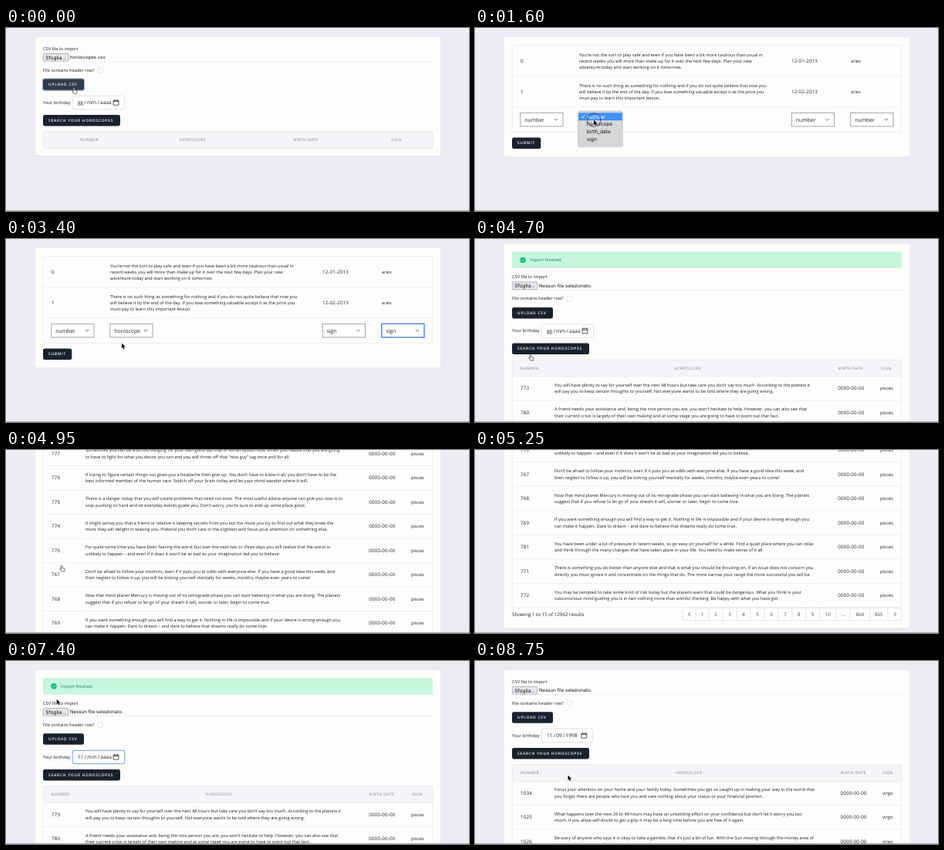
An HTML page that plays this animation: 600x238 px, repeating every 8850 ms.

```html
<!DOCTYPE html>
<html lang="en">
<head>
<meta charset="utf-8">
<title>CSV import</title>
<style>
html, body { margin: 0; width: 100%; height: 100%; overflow: hidden; background: #ecedf2; }
svg { display: block; width: 100%; height: 100%; font-family: "Open Sans", "Noto Sans", sans-serif; text-rendering: geometricPrecision; }
.native { font-family: Inter, Roboto, sans-serif; }
</style>
</head>
<body>
<svg id="stage" viewBox="0 0 600 238"></svg>
<script>
const LOOP = 8850;
const INK = '#1b212c', LINE = '#e3e5ea', DARK = '#19212d';
const FIELDS = ['number', 'horoscope', 'birth_date', 'sign'];
const stage = document.getElementById('stage');

const MAPPING = [
  ['0', '12-01-2013', ['You’re not the sort to play safe and even if you have been a bit more cautious than usual in', 'recent weeks you will more than make up for it over the next few days. Plan your new', 'adventure today and start working on it tomorrow.']],
  ['1', '12-02-2013', ['There is no such thing as something for nothing and if you do not quite believe that now you', 'will believe it by the end of the day. If you lose something valuable accept it as the price you', 'must pay to learn this important lesson.']]
];
const PISCES = [
  [773, 'You will have plenty to say for yourself over the next 48 hours but take care you don’t say too much. According to the planets it', 'will pay you to keep certain thoughts to yourself. Not everyone wants to be told where they are going wrong.'],
  [780, 'A friend needs your assistance and, being the nice person you are, you won’t hesitate to help. However, you can also see that', 'their current crisis is largely of their own making and at some stage you are going to have to point out that fact.'],
  [779, 'You seem to be in a hurry to get things done but there is no need to rush. Take your time over every task today and you will', 'find that the results are better than anything you could have managed at full speed.'],
  [778, 'Someone you meet by chance will say something that makes you think again about a plan you had given up on. Listen to them', 'with an open mind and you may discover that it was a good idea after all.'],
  [777, 'Sometimes you can be a bit too obliging for your own good but that is not an option now. When you realize that you are going', 'to have to fight for what you desire you can and you will throw off that “nice guy” tag once and for all.'],
  [776, 'If trying to figure certain things out gives you a headache then give up. You don’t have to know it all, you don’t have to be the', 'best informed member of the human race. Switch off your brain today and let your mind wander where it will.'],
  [775, 'There is a danger today that you will create problems that need not exist. The most useful advice anyone can give you now is to', 'stop pushing so hard and let everyday events guide you. Don’t worry, you’re sure to end up some place good.'],
  [774, 'It might annoy you that a friend or relative is keeping secrets from you but the more you try to find out what they know the', 'more they will delight in teasing you. Pretend you don’t care in the slightest and focus your attention on something else.'],
  [770, 'For quite some time you have been fearing the worst but over the next two or three days you will realize that the worst is', 'unlikely to happen – and even if it does it won’t be as bad as your imagination led you to believe.'],
  [767, 'Don’t be afraid to follow your instincts, even if it puts you at odds with everyone else. If you have a good idea this week, and', 'then neglect to follow it up, you will be kicking yourself mentally for weeks, months, maybe even years to come!'],
  [768, 'Now that mind planet Mercury is moving out of its retrograde phase you can start believing in what you are doing. The planets', 'suggest that if you refuse to let go of your dream it will, sooner or later, begin to come true.'],
  [769, 'If you want something enough you will find a way to get it. Nothing in life is impossible and if your desire is strong enough you', 'can make it happen. Dare to dream – and dare to believe that dreams really do come true.'],
  [781, 'You have been under a lot of pressure in recent weeks, so go easy on yourself for a while. Find a quiet place where you can relax', 'and think through the many changes that have taken place in your life. You need to make sense of it all.'],
  [771, 'There is something you do better than anyone else and that is what you should be focusing on. If an issue does not concern you', 'directly you must ignore it and concentrate on the things that do. The more narrow your range the more successful you will be.'],
  [772, 'You may be tempted to take some kind of risk today but the planets warn that could be dangerous. What you think is your', 'subconscious mind guiding you is in fact nothing more than wishful thinking. Be happy with what you have got.']
];
const VIRGO = [
  [1034, 'Focus your attention on your home and your family today. Sometimes you get so caught up in making your way in the world that', 'you forget there are people who love you and care nothing about your status or your financial position.'],
  [1025, 'What happens over the next 24 to 48 hours may have an unsettling effect on your confidence but don’t let it worry you too', 'much. If you allow self-doubt to get a grip it may be a long time before you are free of it again.'],
  [1026, 'Be wary of anyone who says it is okay to take a gamble, that it’s just a bit of fun. With the Sun moving through the money area of', 'your chart you cannot afford to be careless with what you own.']
];

// Drawing helpers; text is placed by its vertical centre.
const text = (x, y, s, { size = 5.65, fill = INK, weight = 400, gap = 0, anchor = 'start', cls = '' } = {}) =>
  `<text class="${cls}" x="${x}" y="${(y + size * .34).toFixed(2)}" font-size="${size}" fill="${fill}" font-weight="${weight}" letter-spacing="${gap}" text-anchor="${anchor}">${s}</text>`;
const native = (x, y, s, options) => text(x, y, s, { cls: 'native', fill: '#111', ...options });
const rect = (x, y, w, h, fill, stroke = 'none', r = 0, sw = .6) =>
  `<rect x="${x}" y="${y}" width="${w}" height="${h}" rx="${r}" fill="${fill}" stroke="${stroke}" stroke-width="${sw}"/>`;
const path = (d, stroke, sw = .7, fill = 'none', extra = '') =>
  `<path d="${d}" fill="${fill}" stroke="${stroke}" stroke-width="${sw}" stroke-linecap="round" stroke-linejoin="round" ${extra}/>`;
const hLine = y => path(`M48 ${y}H553`, LINE, .6);
const digits = (x, y, s) => text(x, y, s, { size: 6.2, gap: .18 });
const card = h => rect(38, 13, 525, h, '#dfe1e6', 'none', 3) + rect(38, 12, 525, h, '#fdfdfc', 'none', 3);
const heading = (x, y, s) => text(x, y, s, { size: 4.92, gap: .57, fill: '#737a87', anchor: 'middle' });

function button(y, w, label, active) {
  const ring = active ? rect(47.4, y - .6, w + 1.2, 15.7, 'none', '#9fb4d2', 2.8, 1.1) : '';
  return ring + rect(48, y, w, 14.5, active ? '#303a49' : DARK, 'none', 2.4) +
    text(55, y + 7.2, label, { size: 4.92, gap: .77, weight: 600, fill: '#fff' });
}

function dateInput(parts, focused) {
  const filled = parts[2].length === 4 && parts[2] !== 'aaaa' ? 1.2 : 0;
  const spans = parts.join('|/|').split('|').map((p, i) => `<tspan dx="${i ? 1.2 : 0}">${p}</tspan>`).join('');
  const x = 139.5 - filled;
  return rect(86.3, 88.3, 67.4 - filled, 17.4, '#fff', focused ? '#8fb4ee' : '#d3d6dd', 2.4, focused ? 1.2 : .7) +
    text(93, 97, spans, { size: 6.56 }) +
    path(`M${x} 94.2h6.4v6h-6.4zM${x} 95.6h6.4M${x + 1.4} 93v1.2M${x + 5} 93v1.2`, '#30343c', .8);
}

function form({ file, date, dateFocus, upload, search }) {
  return text(48, 27, 'CSV file to import') +
    rect(48.3, 33.3, 32.6, 10, '#e6e6ea', '#85858f', 1.4) +
    native(64.6, 38.3, 'Sfoglia...', { size: 6.5, anchor: 'middle' }) +
    native(83, 38.3, file, { size: 6.1 }) + hLine(43.8) +
    text(48, 55, 'File contains header row?') + rect(119.3, 52, 6.2, 6.2, '#fff', '#cfd3da', 1.9) +
    button(66.3, 53, 'UPLOAD CSV', upload) +
    text(48, 97, 'Your birthday') + dateInput(date, dateFocus) +
    button(113, 100, 'SEARCH YOUR HOROSCOPES', search);
}

function tableHead(centres, bottom) {
  const labels = ['NUMBER', 'HOROSCOPE', 'BIRTH DATE', 'SIGN'];
  return rect(48.3, 134.7, 504.4, bottom - 134.7, '#fdfdfc', LINE, 2.5) +
    rect(48.3, 134.7, 504.4, 21.5, '#f4f5f8', LINE, 2.5) +
    labels.map((s, i) => heading(centres[i], 145.7, s)).join('');
}

const resultRows = (rows, sign, dateX, signX) => rows.map(([id, a, b], i) => {
  const y = 171.5 + 31.5 * i;
  return digits(59, y, id) + text(103, y - 4.1, a) + text(103, y + 4.1, b) +
    digits(dateX, y, '0000-00-00') + text(signX, y, sign, { size: 5.9 }) + (i < rows.length - 1 ? hLine(y + 15.8) : '');
}).join('');

function pagination(y) {
  const edges = [269, 286, 303, 321, 339, 357, 375, 393, 411, 428.5, 446.5, 468, 486, 511.5, 535, 553];
  const labels = ['', 1, 2, 3, 4, 5, 6, 7, 8, 9, 10, '...', 864, 865, ''];
  return text(48, y, 'Showing 1 to 15 of 12962 results', { size: 6.2 }) +
    rect(269.3, y - 8, 283.4, 16, '#fff', '#d3d6dd', 2.4) +
    edges.slice(1, -1).map(x => path(`M${x} ${y - 8}v16`, '#d3d6dd', .6)).join('') +
    labels.map((s, i) => text((edges[i] + edges[i + 1]) / 2, y, s, { size: 6.2, anchor: 'middle', fill: '#3b4350' })).join('') +
    path(`M278.4 ${y - 2}l-2 2l2 2M543.6 ${y - 2}l2 2l-2 2`, '#3b4350', .9);
}

const banner = rect(48, 22, 505, 21.5, '#c7f6de', 'none', 1.5) +
  '<circle cx="62" cy="32.8" r="3.7" fill="#10b77c"/>' + path('M60.4 32.9l1.2 1.2l2.1-2.3', '#c7f6de', .9) +
  text(71, 32.8, 'Import finished.', { fill: '#1f7c5c' });

const uploadTable = tableHead([108, 242, 389, 506], 156.2);
const piscesTable = tableHead([70.5, 276, 487, 533], 628) + resultRows(PISCES, 'pisces', 470.3, 525) + pagination(637);
const virgoTable = tableHead([71, 277.5, 490.5, 535], 628) + resultRows(VIRGO, 'virgo', 473.5, 528);
const mappingTable = rect(48.3, 22.3, 504.4, 112.9, '#fdfdfc', LINE) + hLine(63) + hLine(103) +
  MAPPING.map(([id, date, lines], i) => {
    const y = 43 + 40.2 * i;
    return digits(59, y, id) + digits(410, y, date) + text(487, y, 'aries') +
      lines.map((s, k) => text(135, y + (k - 1) * 8.3, s)).join('');
  }).join('');

// Each select: position, opening time, choosing time, chosen field.
const SELECTS = [[58.8, 1250, 1400, 0], [134.8, 1550, 1850, 1], [410.3, 2250, 2550, 3], [486.8, 2850, 3170, 3]];

function selectBox([x, open, chosen, value], t, focused) {
  return rect(x, 110.3, 55.2, 17.6, '#fff', focused ? '#3d78e8' : '#959bab', 0, focused ? 1.3 : .9) +
    text(x + 5.5, 119.2, FIELDS[t < chosen ? 0 : value], { size: 6.8 }) +
    path(`M${x + 44.2} 118.2l2 2l2-2`, '#5a616e', .9);
}

function popup(x, pointerY) {
  const hover = Math.max(0, Math.min(3, Math.floor((pointerY - 110.3) / 9.9)));
  return rect(x - 2, 108.6, 59, 47, '#0002', 'none', 3) + rect(x - .6, 107.8, 56.6, 45.4, '#d7d7d7', '#c2c2c2', 2, .5) +
    rect(x - .6, 110.3 + hover * 9.9, 56.6, 9.9, '#4090fa') +
    path(`M${x + 3.5} 115.4l1.3 1.7l2.4-3.8`, hover ? '#111' : '#fff', .9) +
    FIELDS.map((s, i) => native(x + 10, 115.3 + i * 9.9, s, { size: 6.6, fill: i === hover ? '#fff' : '#111' })).join('');
}

function mappingPage(t, pointerY) {
  const current = SELECTS.findLast(s => t >= s[1]);
  const open = current && t < current[2];
  return card(155.4) + mappingTable + SELECTS.map(s => selectBox(s, t, s === current && t < 3700)).join('') +
    button(142.6, 37.3, 'SUBMIT', t >= 3880) + (open ? popup(current[0], pointerY) : '');
}

function birthday(t) {
  const year = '1998'.slice(0, Math.max(0, Math.floor((t - 7600) / 100)));
  return [t < 7200 ? 'gg' : '11', t < 7450 ? 'mm' : '09', year || 'aaaa'];
}

function scrollAt(t) {
  if (t < 4698) return 0;
  if (t < 5620) return 466 * (1 - Math.max(0, 1 - (t - 4698) / 852) ** 3.31);
  if (t < 5870) return 466 * (1 - ((t - 5620) / 250) ** 1.4);
  if (t < 6070) return -5 * Math.sin(Math.PI * ((t - 5870) / 200) ** .5) * (6070 - t) / 200 * 1.1;
  return 0;
}

// Pointer waypoints: time, x, y.
const POINTER = [
  [0, 88, 77.6], [400, 88, 77.6], [1150, 86, 117], [1400, 86, 117], [1550, 154, 119.6], [1640, 154, 119.6],
  [1800, 155, 126], [1880, 155, 126], [2220, 438, 118], [2300, 438, 118], [2500, 430, 145], [2570, 430, 145],
  [2800, 514, 118], [2900, 514, 118], [3100, 508, 145], [3180, 508, 145], [3400, 150, 135.5], [3700, 64, 149],
  [3880, 64, 149], [4150, 64, 149], [4400, 72, 150.3], [5650, 72, 150.3], [5980, 168, 145], [6050, 168, 145],
  [6500, 148, 138], [6750, 148, 138], [6930, 97, 125], [7100, 97, 125], [7500, 60, 36], [7950, 60, 36],
  [8400, 120.5, 148.5], [LOOP, 120.5, 148.5]
];
const CLICKS = [1250, 1570, 1840, 2250, 2540, 2850, 3150, 3880, 6940, 8440];

function pointerAt(t) {
  const i = POINTER.findIndex(p => p[0] > t);
  const [t0, x0, y0] = POINTER[i - 1], [t1, x1, y1] = POINTER[i];
  const p = (t - t0) / (t1 - t0), e = p * p * (3 - 2 * p);
  return [x0 + (x1 - x0) * e, y0 + (y1 - y0) * e];
}

function pointer(t, x, y) {
  if (t > 5080 && t < 5640) return '';
  const hand = t < 480 || (t > 3600 && t < 5080) || (t > 8330 && t < 8550);
  const ring = CLICKS.some(c => t >= c && t < c + 100) ? `<circle cx="${x + .3}" cy="${y}" r="8.8" fill="none" stroke="#333c" stroke-width=".9"/>` : '';
  const shape = hand
    ? path('M-.8 .8q0-.9 .8-.9t.8 .9v2.3l2.6 .6q1 .3 .8 1.3l-.6 2.7h-3.5l-2.2-2.9q-.4-.8 .4-.9l.9 .6z', '#1c1c1c', .6, '#fff')
    : path('M0 0v6.6l1.5-1.4l1.1 2.5l1.1-.5l-1.1-2.4h2z', '#fff', .7, '#000', 'paint-order="stroke"');
  return ring + `<g transform="translate(${x.toFixed(2)} ${y.toFixed(2)})">${shape}</g>`;
}

function page(t, pointerY) {
  if (t < 500) return card(154) + form({ file: 'horoscopes.csv', date: birthday(0), upload: true }) + uploadTable;
  if (t < 4150) return mappingPage(t, pointerY);
  const file = 'Nessun file selezionato.';
  if (t >= 8550) return card(660) + form({ file, date: birthday(t) }) + virgoTable;
  const body = form({ file, date: birthday(t), dateFocus: t > 6930 && t < 8430, search: t > 8430 }) + piscesTable;
  return `<g transform="translate(0 ${(-scrollAt(t)).toFixed(2)})">${card(671)}${banner}<g transform="translate(0 28)">${body}</g></g>`;
}

let shown = '';
function draw(now) {
  const t = now % LOOP;
  const [x, y] = pointerAt(t);
  const markup = rect(0, 0, 600, 238, '#ecedf2') + page(t, y) + rect(0, 237, 600, 1, '#a9aab1') + pointer(t, x, y);
  if (markup !== shown) stage.innerHTML = shown = markup;
}

const start = performance.now();
function tick() {
  draw(performance.now() - start);
  requestAnimationFrame(tick);
}
tick();
</script>
</body>
</html>
```
